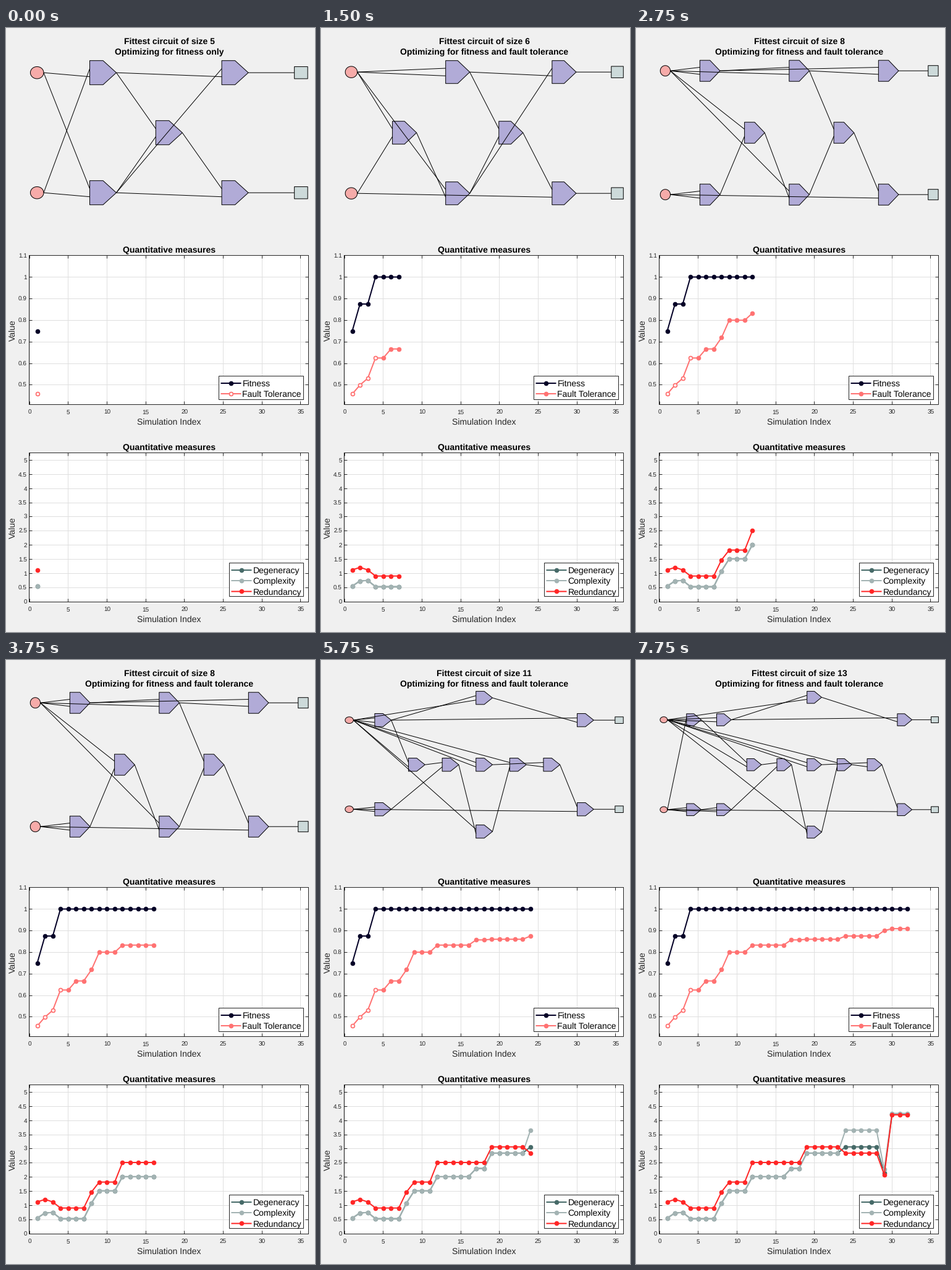
Write a matplotlib script that moves like this. It is 500 px wide and 976 px high and loops after 8 s.

```python
import numpy as np
import matplotlib.pyplot as plt
from matplotlib.animation import FuncAnimation
from matplotlib.collections import LineCollection, PolyCollection
from matplotlib.patches import Rectangle

plt.rcParams.update({"font.family": "Liberation Sans", "text.hinting": "none",
                     "path.snap": False})

WIDTH, HEIGHT, DPI = 500, 976, 64
PT = 72 / DPI  # points per pixel
STEPS, INTERVAL = 32, 250

INK = "#262626"
NAVY, CORAL = "#030026", "#ff7272"
TEAL, SILVER, RED = "#466a68", "#a3b3b3", "#ff2626"
GATE, INPUT, OUTPUT = "#b1abd7", "#f6aba9", "#cddada"

# Gate code: name, column, row, upper source, lower source (x, y are the inputs).
ROWS = {"t": -3, "u": -2, "m": 0, "d": 2, "b": 3}
MID_Y = 168.7

# first step, gate width, gate height, row unit, first column x, column step, gates
CIRCUITS = [
    (1, 43, 39, 48.5, 49.7, 106.8, "A1uyx B1dxy C2mAB D3uBA E3dCB"),
    (2, 43, 39, 48.5, 49.7, 106.8, "A1uxx B1dxy C2mAB D3uBA E3dCB"),
    (4, 43, 39, 48.5, 49.7, 106.8, "A1uxx B1dxy C2mAB D3uBA E3dCy"),
    (6, 39, 37, 49, 48.5, 86.1, "G1mxy A2uxx B2dxG C3mAB D4uBA E4dCy"),
    (8, 35, 35, 49.5, 47.4, 72.05, "F1myy G2mxF A3uxx B3dxG C4mAB D5uBA E5dCy"),
    (9, 35, 35, 49.5, 47.4, 72.05, "F1myy G2mxF A3uxx B3dxG C4mAB D5uAA E5dCy"),
    (12, 32.6, 34, 50, 46.9, 72.25,
     "H1uxx F1dyy G2mxF A3uHx B3dxG C4mAB D5uHA E5dCy"),
    (17, 31, 22, 35.8, 46.4, 72.4,
     "H1uxx F1dyy G2mxF A3tHx I3mxx B3bxG C4mIB D5uHA E5dCy"),
    (19, 28.3, 22, 35.8, 45.9, 62.2,
     "H1uxx F1dyy G2mxF A3tHx I3mxx B3bxG C4mxB J5mIC D6uHA E6dJy"),
    (24, 26.7, 21.3, 36, 45.2, 54.6,
     "H1uxx F1dyy K2mHx G3mKF A4tHx I4mxx B4bxG C5mxB J6mIC D7uHA E7dJy"),
    (29, 25, 20.3, 36.2, 44.8, 48.7,
     "L1uyx H2uxx F2dyy K3mLx G4mKF A5tHx I5mxx B5bxG C6mxB J7mIC D8uHA E8dJy"),
    (30, 23.7, 19.5, 36.3, 44.4, 48.73,
     "L1uyx M1dyy H2uxx F2dMy K3mLx G4mKF A5tHx I5mxx B5bxG C6mxB J7mIC "
     "D8uHA E8dJy"),
]

SIM = np.arange(1, STEPS + 1)
FITNESS = np.repeat([.75, .875, 1], [1, 2, 29])
TOLERANCE = np.repeat(
    [.4583, .5, .531, .625, .667, .719, .8, .833, .857, .86, .875, .9, .909],
    [1, 1, 1, 2, 2, 1, 3, 5, 2, 5, 5, 1, 3])
COMPLEXITY = np.repeat(
    [.56, .74, .76, .54, 1.09, 1.52, 2.02, 2.31, 2.85, 3.66, 2.27, 4.25],
    [1, 1, 1, 4, 1, 3, 5, 2, 5, 5, 1, 3])
REDUNDANCY = np.repeat(
    [1.13, 1.22, 1.13, .915, 1.48, 1.83, 2.52, 3.07, 2.85, 2.09, 4.2],
    [1, 1, 1, 4, 1, 3, 7, 5, 5, 1, 3])
DEGENERACY = COMPLEXITY.copy()
DEGENERACY[23:28], DEGENERACY[28], DEGENERACY[29:] = 3.07, 2.15, 4.21
HOLLOW = 4  # steps run on fitness alone

fig = plt.figure(figsize=(WIDTH / DPI, HEIGHT / DPI), dpi=DPI, facecolor="#f0f0f0")
# Whole coordinates fall on pixel centres.
ax = fig.add_axes([0, 0, 1, 1])
ax.set_xlim(-.5, WIDTH - .5)
ax.set_ylim(HEIGHT - .5, -.5)
ax.axis("off")


def sim_x(v):
    return 37.5 + 12.54 * v


def upper_y(v):
    return 367 + 349 * (1.1 - v)


def lower_y(v):
    return 927 - 45.85 * v


def text(x, y, s, size=14, color=INK, **kw):
    kw = {"ha": "center", "va": "baseline", **kw}
    return ax.text(x, y, s, fontsize=size * PT, color=color, **kw)


def line(xs, ys, color=INK, width=1, z=2, **kw):
    return ax.plot(xs, ys, color=color, lw=width * PT, zorder=z, **kw)[0]


def series(color, z, xs=(), ys=()):
    return line(xs, ys, color, 2, z, marker="o", ms=6.4 * PT, mec=color,
                mew=1.2 * PT, solid_joinstyle="round")


def rings(z, xs=(), ys=()):
    return line(xs, ys, CORAL, 0, z, ls="none", marker="o", ms=5.6 * PT,
                mfc="white", mec=CORAL, mew=1.5 * PT)


def box(x0, y0, x1, y1, z, face="white", edge=INK):
    ax.add_patch(Rectangle((x0, y0), x1 - x0, y1 - y0, fc=face, ec=edge,
                           lw=PT, zorder=z))


def panel(top, bottom, ticks, to_y):
    left, right = 37, 489
    box(left, top, right, bottom, 0, edge="none")
    for v in range(0, 36, 5):
        x = round(sim_x(v))
        line([x, x], [top, bottom], "#dfdfdf", z=1)
        line([x, x], [bottom - 4.5, bottom])
        line([x, x], [top, top + 4.5])
        text(sim_x(v), bottom + 15, f"{v}", 10)
    for v in ticks:
        y = round(to_y(v))
        line([left, right], [y, y], "#dfdfdf", z=1)
        line([left, left + 4.5], [y, y])
        line([right - 4.5, right], [y, y])
        text(33.5, y + 3.8, f"{v:g}", 10, ha="right")
    box(left, top, right, bottom, 2, face="none")
    text(263.7, top - 5, "Quantitative measures", color="black", weight="bold")
    text(263.7, bottom + 32, "Simulation Index")
    text(14, (top + bottom) / 2 + 1, "Value", rotation=90, rotation_mode="anchor")


def legend(left, top, bottom, entries):
    box(left, top, 481, bottom, 8)
    for y, name, color in entries:
        line([left + 4, left + 35], [y, y], color, 2, 9)
        series(color, 9, [left + 19.3], [y])
        text(left + 38, y + 5.3, name, color="black", ha="left", zorder=9)


panel(367, 608, np.arange(5, 12) / 10, upper_y)
panel(686, 927, np.arange(0, 5.1, .5), lower_y)
legend(344, 562, 600, [(573.5, "Fitness", NAVY), (590.5, "Fault Tolerance", CORAL)])
legend(361, 864, 918, [(875.5, "Degeneracy", TEAL), (892.5, "Complexity", SILVER),
                       (910, "Redundancy", RED)])
legend_ring = rings(10, [363.3], [590.5])

curves = [
    (series(NAVY, 5), upper_y(FITNESS)),
    (series(CORAL, 5), upper_y(TOLERANCE)),
    (series(TEAL, 5), lower_y(DEGENERACY)),
    (series(SILVER, 6), lower_y(COMPLEXITY)),
    (series(RED, 7), lower_y(REDUNDANCY)),
]
ring_dots = rings(6)

title = text(263.7, 25, "", color="black", weight="bold")
subtitle = text(263.7, 43, "", color="black", weight="bold")
shapes = ax.add_collection(PolyCollection([], edgecolors="black", linewidths=PT,
                                          zorder=3))
wires = ax.add_collection(LineCollection([], colors="black", linewidths=PT, zorder=4))


def build(w, h, unit, x0, step, code):
    """Return the polygons, their colours, the wires and the size of one circuit."""
    gates = code.split()
    turn = np.linspace(0, 2 * np.pi, 60, endpoint=False)
    polys, colors, segs, tips = [], [], [], {}

    def row_y(key):
        return MID_Y + unit * ROWS[key]

    for name, key in zip("xy", "ud"):
        y = row_y(key)
        polys.append(np.c_[x0 + w / 4 * np.cos(turn), y + h / 4 * np.sin(turn)])
        colors.append(INPUT)
        tips[name] = (x0 + w / 4, y)

    for name, col, key, *_ in gates:
        x, y = x0 + step * int(col), row_y(key)
        a, b = w / 2, h / 2
        polys.append([(x - a, y - b), (x, y - b), (x + a, y), (x, y + b), (x - a, y + b)])
        colors.append(GATE)
        tips[name] = (x + a, y)

    for _, col, key, *sources in gates:
        x, y = x0 + step * int(col) - w / 2, row_y(key)
        for src, dy in zip(sources, (-h / 6, h / 6)):
            segs.append([tips[src], (x, y + dy)])

    x = x0 + step * (int(gates[-1][1]) + 1)
    for name in "DE":
        y, a, b = tips[name][1], w / 4, h / 4
        polys.append([(x - a, y - b), (x + a, y - b), (x + a, y + b), (x - a, y + b)])
        colors.append(OUTPUT)
        segs.append([tips[name], (x - a, y)])
    return polys, colors, segs, len(gates)


BUILT = [(first, build(*spec)) for first, *spec in CIRCUITS]


def update(i):
    n = i + 1
    polys, colors, segs, size = [c for first, c in BUILT if first <= n][-1]
    shapes.set_verts(polys)
    shapes.set_facecolor(colors)
    wires.set_segments(segs)

    goal = "fitness only" if n <= HOLLOW else "fitness and fault tolerance"
    title.set_text(f"Fittest circuit of size {size}")
    subtitle.set_text(f"Optimizing for {goal}")

    for curve, ys in curves:
        curve.set_data(sim_x(SIM[:n]), ys[:n])
    k = min(n, HOLLOW)
    ring_dots.set_data(sim_x(SIM[:k]), upper_y(TOLERANCE[:k]))
    legend_ring.set_visible(n <= HOLLOW)
    return []


anim = FuncAnimation(fig, update, frames=STEPS, interval=INTERVAL, repeat=True,
                     repeat_delay=0, blit=False)
plt.show()
```
